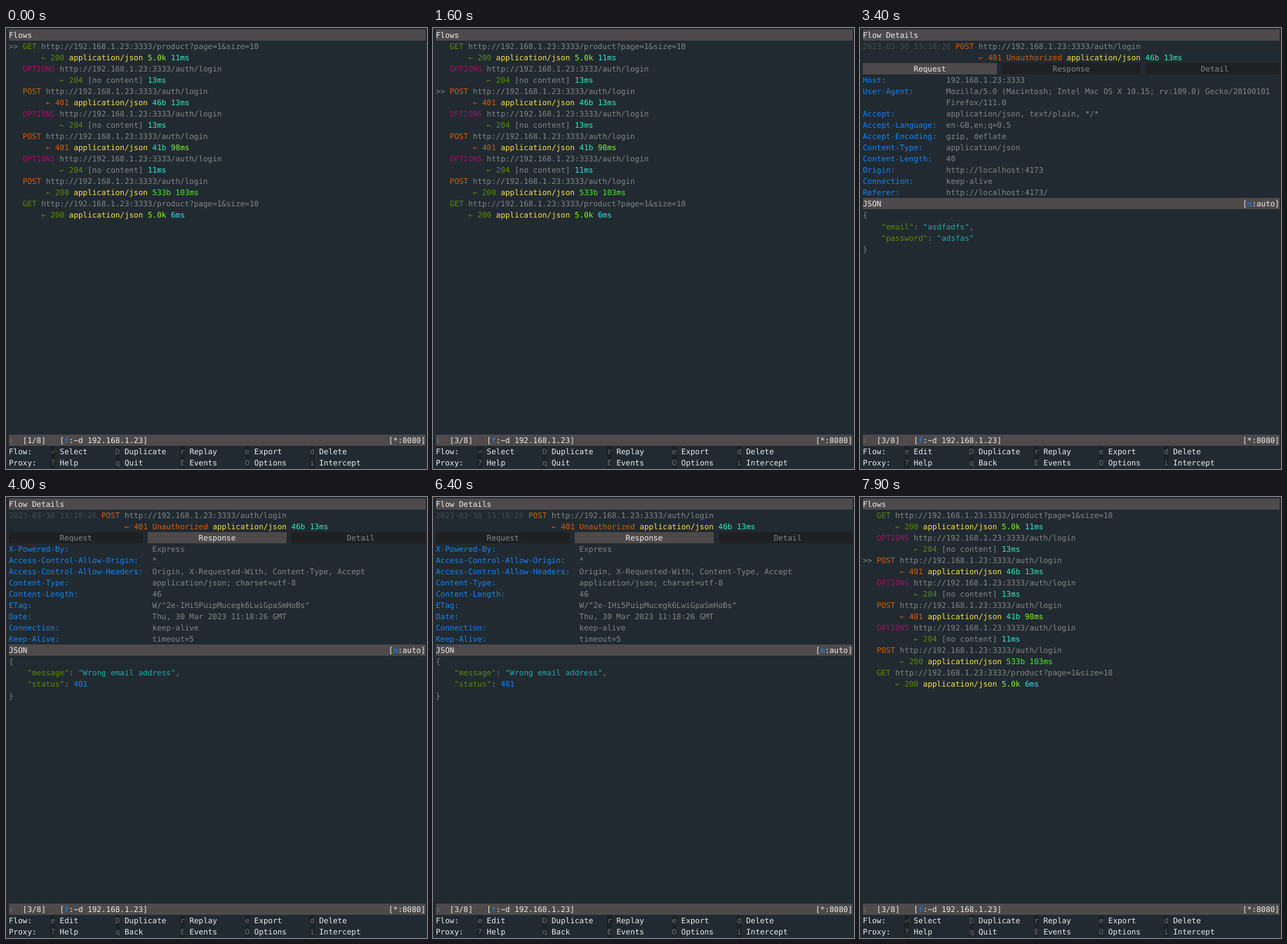
An HTML page that plays this animation: 600x628 px, repeating every 8000 ms.

```html
<!DOCTYPE html>
<html lang="en">
<head>
<meta charset="utf-8">
<title>Proxy flows</title>
<style>
  html, body { margin: 0; width: 100%; height: 100%; overflow: hidden; background: #212a30; }
  #screen {
    position: absolute; left: 4px; top: 2px; width: 594px; height: 626px;
    font: 10.963px/18px "DejaVu Sans Mono", monospace;
    text-rendering: geometricPrecision; font-variant-ligatures: none;
  }
  #screen span { position: absolute; height: 16px; white-space: pre; }
</style>
</head>
<body>
<div id="screen"></div>
<script>
const CELL = 6.6, ROW = 16.03, COLS = 90, LOOP = 8000;
const C = {
  bar: '#4e4a4c', white: '#ececec', gray: '#838686', dim: '#454c50', tab: '#1f2021', key: '#1d2123',
  green: '#5a8a08', purple: '#981464', orange: '#d65c0a', yellow: '#fce04c',
  lime: '#84f82c', cyan: '#30ead8', mint: '#32ebb8', sky: '#36e4ee', leaf: '#48ee26',
  blue: '#1484f4', teal: '#1faaaa'
};
const METHOD_COLORS = { GET: C.green, OPTIONS: C.purple, POST: C.orange };

const LOGIN = 'http://192.168.1.23:3333/auth/login';
const PRODUCT = 'http://192.168.1.23:3333/product?page=1&size=10';
// method, url, status, size, size color, duration, duration color
const FLOWS = [
  ['GET', PRODUCT, 200, '5.0k', C.lime, '11ms', C.cyan],
  ['OPTIONS', LOGIN, 204, '', '', '13ms', C.mint],
  ['POST', LOGIN, 401, '46b', C.mint, '13ms', C.mint],
  ['OPTIONS', LOGIN, 204, '', '', '13ms', C.mint],
  ['POST', LOGIN, 401, '41b', C.mint, '98ms', C.lime],
  ['OPTIONS', LOGIN, 204, '', '', '11ms', C.cyan],
  ['POST', LOGIN, 200, '533b', C.leaf, '103ms', C.leaf],
  ['GET', PRODUCT, 200, '5.0k', C.lime, '6ms', C.sky]
];

const TABS = [['Request', 0, 29], ['Response', 30, 30], ['Detail', 61, 29]];
const MESSAGES = {
  Request: {
    valueCol: 18,
    headers: [
      ['Host:', '192.168.1.23:3333'],
      ['User-Agent:', 'Mozilla/5.0 (Macintosh; Intel Mac OS X 10.15; rv:109.0) Gecko/20100101'],
      ['', 'Firefox/111.0'],
      ['Accept:', 'application/json, text/plain, */*'],
      ['Accept-Language:', 'en-GB,en;q=0.5'],
      ['Accept-Encoding:', 'gzip, deflate'],
      ['Content-Type:', 'application/json'],
      ['Content-Length:', '40'],
      ['Origin:', 'http://localhost:4173'],
      ['Connection:', 'keep-alive'],
      ['Referer:', 'http://localhost:4173/']
    ],
    body: { email: 'asdfadfs', password: 'adsfas' }
  },
  Response: {
    valueCol: 31,
    headers: [
      ['X-Powered-By:', 'Express'],
      ['Access-Control-Allow-Origin:', '*'],
      ['Access-Control-Allow-Headers:', 'Origin, X-Requested-With, Content-Type, Accept'],
      ['Content-Type:', 'application/json; charset=utf-8'],
      ['Content-Length:', '46'],
      ['ETag:', 'W/"2e-IHi5PuipMucegk6LwiGpaSmHoBs"'],
      ['Date:', 'Thu, 30 Mar 2023 11:18:26 GMT'],
      ['Connection:', 'keep-alive'],
      ['Keep-Alive:', 'timeout=5']
    ],
    body: { message: 'Wrong email address', status: 401 }
  }
};

// start time, selected flow, open tab (none means the list)
const STEPS = [
  [0, 1, ''], [900, 2, ''], [1200, 3, ''],
  [2000, 3, 'Request'], [3900, 3, 'Response'], [6700, 3, 'Request'], [7600, 3, '']
];

const screen = document.getElementById('screen');

function put(row, col, text, color, background = '', width = 0) {
  const span = document.createElement('span');
  span.textContent = text;
  span.style.cssText = `left:${col * CELL}px;top:${Math.round(row * ROW)}px;` +
    `color:${color};background:${background};` + (width ? `width:${width * CELL}px` : '');
  screen.append(span);
}

// Writes [text, color] pairs one after another, each followed by a gap.
function putRun(row, col, parts, gap = 0) {
  for (const [text, color] of parts) {
    put(row, col, text, color);
    col += text.length + gap;
  }
}

function bar(row, text) {
  put(row, 0, text, C.white, C.bar, COLS);
}

function drawList(selected) {
  bar(0, 'Flows');
  FLOWS.forEach(([method, url, status, size, sizeColor, time, timeColor], i) => {
    const row = 1 + i * 2;
    const statusColor = status === 401 ? C.orange : C.green;
    if (i + 1 === selected) put(row, 0, '>>', C.gray);
    putRun(row, 3, [[method, METHOD_COLORS[method]], [url, C.gray]], 1);
    const content = size
      ? [['application/json', C.yellow], [size, sizeColor]]
      : [['[no content]', C.gray]];
    putRun(row + 1, 4 + method.length,
      [['←', statusColor], [`${status}`, statusColor], ...content, [time, timeColor]], 1);
  });
}

function drawDetails(openTab) {
  const { valueCol, headers, body } = MESSAGES[openTab];
  bar(0, 'Flow Details');
  putRun(1, 0, [['2023-03-30 13:18:26', C.dim], ['POST', C.orange], [LOGIN, C.gray]], 1);
  putRun(2, 25, [['←', C.orange], ['401', C.orange], ['Unauthorized', C.orange],
    ['application/json', C.yellow], ['46b', C.mint], ['13ms', C.mint]], 1);
  for (const [name, col, width] of TABS) {
    const open = name === openTab;
    put(3, col, ' '.repeat(Math.ceil((width - name.length) / 2)) + name,
      open ? C.white : C.gray, open ? C.bar : C.tab, width);
  }
  headers.forEach(([name, value], i) => {
    put(4 + i, 0, name, C.blue);
    put(4 + i, valueCol, value, C.gray);
  });

  let row = 4 + headers.length;
  bar(row, 'JSON');
  putRun(row, 82, [['[', C.white], ['m', C.blue], [':auto]', C.white]]);
  put(++row, 0, '{', C.gray);
  Object.entries(body).forEach(([name, value], i, all) => {
    putRun(++row, 4, [
      [`"${name}"`, C.green], [': ', C.gray],
      [JSON.stringify(value), typeof value === 'number' ? C.blue : C.teal],
      [i < all.length - 1 ? ',' : '', C.gray]
    ]);
  });
  put(++row, 0, '}', C.gray);
}

function drawFooter(selected, inDetails) {
  bar(36, '');
  put(36, 0, '⇩', C.gray);
  put(36, 3, `[${selected}/8]`, C.white);
  putRun(36, 11, [['[', C.white], ['f', C.blue], [':~d 192.168.1.23]', C.white]]);
  put(36, 82, '[*:8080]', C.white);
  const menus = [
    ['Flow:', inDetails ? 'e Edit' : '⏎ Select', 'D Duplicate', 'r Replay', 'e Export', 'd Delete'],
    ['Proxy:', '? Help', inDetails ? 'q Back' : 'q Quit', 'E Events', 'O Options', 'i Intercept']
  ];
  menus.forEach(([title, ...items], i) => {
    put(37 + i, 0, title, C.white);
    items.forEach((item, j) => {
      const col = 9 + j * 14;
      put(37 + i, col, item[0], '#6a6e70', C.key, 1);
      put(37 + i, col + 2, item.slice(2), C.white);
    });
  });
}

let shown;
function frame(now) {
  const time = now % LOOP;
  const step = STEPS.findLast(([start]) => start <= time);
  if (step !== shown) {
    shown = step;
    const [, selected, tab] = step;
    screen.replaceChildren();
    if (tab) drawDetails(tab); else drawList(selected);
    drawFooter(selected, Boolean(tab));
  }
  requestAnimationFrame(frame);
}
frame(performance.now());
</script>
</body>
</html>
```
